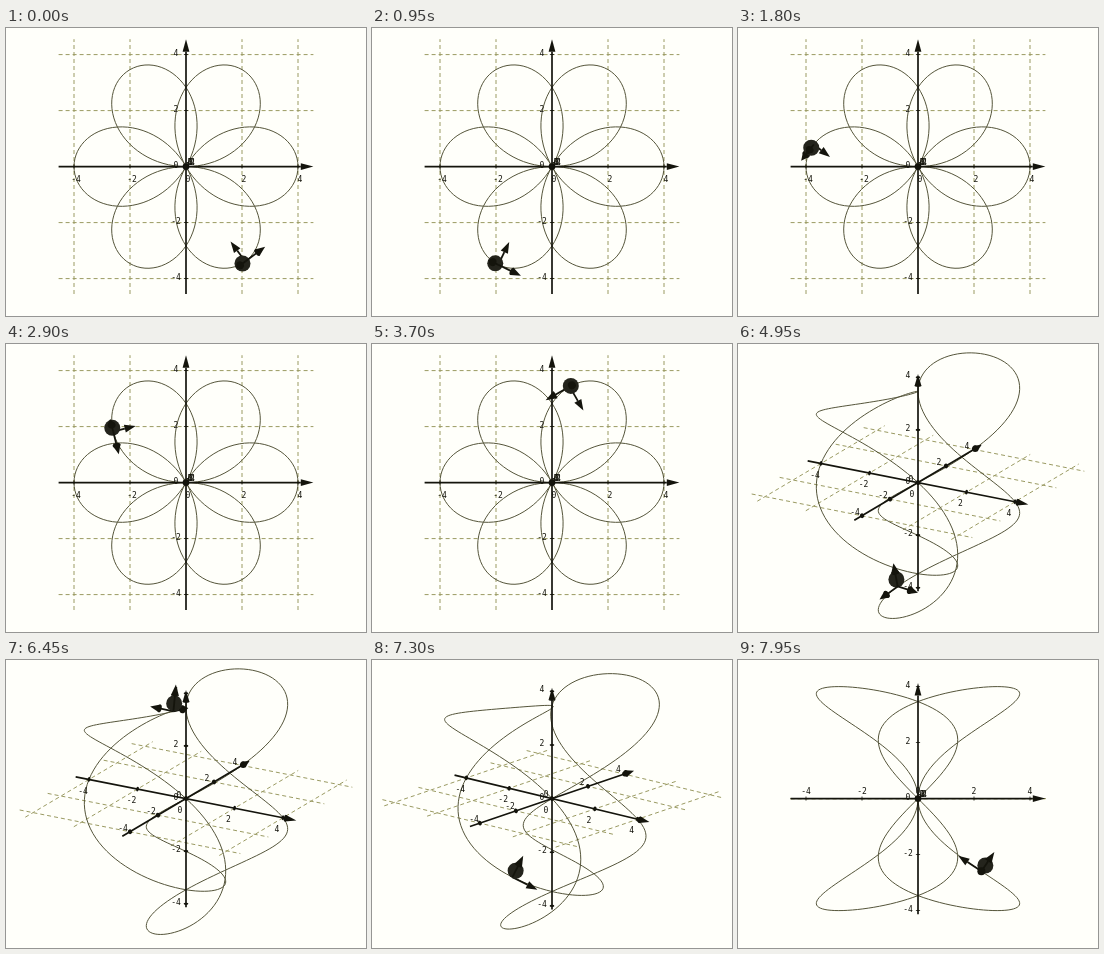
An HTML page with a canvas that plays this animation: 360x288 px, repeating every 8 s.

```html
<!DOCTYPE html>
<html lang="en">
<head>
<meta charset="utf-8">
<title>Moving frame on a space curve</title>
<style>
  html, body { margin: 0; width: 100%; height: 100%; overflow: hidden; background: #fffffa; }
  canvas { display: block; width: 360px; height: 288px; }
</style>
</head>
<body>
<canvas id="stage" width="360" height="288"></canvas>
<script>
const ctx = document.getElementById('stage').getContext('2d');
const LOOP = 8000, STEP = 50, UNIT = 28, CX = 180, CY = 138.6, RAD = Math.PI / 180;
const INK = '#14140c', CURVE = '#55553a', GRID = '#9a9a62', PAPER = '#fffffa';

// time (ms) -> curve parameter (degrees)
const TRAVEL = [[0, 122], [1800, 348], [2900, 505], [4300, 705.5], [4950, 789], [6450, 1004], [7950, 1219.5], [8000, 1226.7]];

// camera poses: turn, elevation and label offsets of the x and y axes
const VIEWS = [
  { turn: 0, lift: 90, xLabel: [2, 13], yLabel: [-10, -1] },
  { turn: 30, lift: 20, xLabel: [-6, 12], yLabel: [-7, -3] },
  { turn: 90, lift: 0, xLabel: [-6, 12], yLabel: [0, -7] }
];
const TURNS = [3905, 6890];
const TURN_TIME = 1000;

const mix = (a, b, s) => a + (b - a) * s;
const mixPair = (a, b, s) => [mix(a[0], b[0], s), mix(a[1], b[1], s)];
const add = (p, v, k = 1) => p.map((c, i) => c + v[i] * k);
const unit = v => { const n = Math.hypot(...v); return v.map(c => c / n); };
const cross = (a, b) => [a[1] * b[2] - a[2] * b[1], a[2] * b[0] - a[0] * b[2], a[0] * b[1] - a[1] * b[0]];

let cam;

function setCamera(t) {
  const leg = t < TURNS[1] ? 0 : 1;
  const s = Math.min(1, Math.max(0, (t - TURNS[leg]) / TURN_TIME)) ** 2;
  const from = VIEWS[leg], to = VIEWS[leg + 1];
  const turn = mix(from.turn, to.turn, s) * RAD, lift = mix(from.lift, to.lift, s) * RAD;
  cam = {
    ca: Math.cos(turn), sa: Math.sin(turn), ce: Math.cos(lift), se: Math.sin(lift),
    xLabel: mixPair(from.xLabel, to.xLabel, s),
    yLabel: mixPair(from.yLabel, to.yLabel, s)
  };
}

function project([x, y, z]) {
  return [
    CX + UNIT * (x * cam.ca + y * cam.sa),
    CY + UNIT * ((x * cam.sa - y * cam.ca) * cam.se - z * cam.ce)
  ];
}

// distance towards the viewer
const depth = ([x, y, z]) => (x * cam.sa - y * cam.ca) * cam.ce + z * cam.se;

function travel(t) {
  const i = Math.max(1, TRAVEL.findIndex(k => k[0] > t));
  const [t0, a] = TRAVEL[i - 1], [t1, b] = TRAVEL[i];
  return mix(a, b, (t - t0) / (t1 - t0)) * RAD;
}

function curvePoint(q) {
  const r = 4 * Math.cos(1.5 * q);
  return [r * Math.cos(q), r * Math.sin(q), -4 * Math.sin(q)];
}

function tangent(q) {
  const r = 4 * Math.cos(1.5 * q), dr = -6 * Math.sin(1.5 * q);
  const c = Math.cos(q), s = Math.sin(q);
  return unit([dr * c - r * s, dr * s + r * c, -4 * c]);
}

function line(a, b, width, color) {
  ctx.strokeStyle = color;
  ctx.lineWidth = width;
  ctx.beginPath();
  ctx.moveTo(...project(a));
  ctx.lineTo(...project(b));
  ctx.stroke();
}

function ellipse([x, y], rx, ry, angle = 0) {
  ctx.beginPath();
  ctx.ellipse(x, y, rx, ry, angle, 0, 2 * Math.PI);
  ctx.fill();
}

// shaft with a cone head; seen end-on the cone becomes a disc
function arrow(from, to, head, half, width) {
  const dir = unit(add(to, from, -1));
  const base = add(to, dir, -head);
  line(from, base, width, INK);
  const tip = project(to), foot = project(base);
  const angle = Math.atan2(tip[1] - foot[1], tip[0] - foot[0]);
  const nx = -Math.sin(angle) * half, ny = Math.cos(angle) * half;
  ctx.fillStyle = INK;
  ctx.beginPath();
  ctx.moveTo(...tip);
  ctx.lineTo(foot[0] + nx, foot[1] + ny);
  ctx.lineTo(foot[0] - nx, foot[1] - ny);
  ctx.fill();
  ellipse(foot, half * Math.abs(depth(dir)), half, angle);
}

function drawGrid() {
  ctx.setLineDash([4, 3]);
  for (const k of [-4, -2, 2, 4]) {
    line([k, -4.55, 0], [k, 4.55, 0], 1, GRID);
    line([-4.55, k, 0], [4.55, k, 0], 1, GRID);
  }
  ctx.setLineDash([]);
}

function drawAxis(dir, reach, offset) {
  const at = k => dir.map(c => c * k);
  arrow(at(-reach), at(reach), 0.45, 3.4, 1.7);
  const d = Math.abs(depth(dir)), flat = Math.sqrt(Math.max(0, 1 - d * d));
  const [ex, ey] = project(dir), angle = Math.atan2(ey - CY, ex - CX);
  const [ox, oy] = flat < 0.12 ? [4, -4] : offset;
  ctx.fillStyle = INK;
  for (const k of [-4, -2, 0, 2, 4]) {
    const p = project(at(k));
    ellipse(p, 0.5 + 1.9 * d, 2.4, angle);
    ctx.fillText(k, p[0] + ox, p[1] + oy);
  }
}

function drawCurve() {
  ctx.strokeStyle = CURVE;
  ctx.lineWidth = 1;
  ctx.beginPath();
  for (let d = 0; d <= 720; d += 2) ctx.lineTo(...project(curvePoint(d * RAD)));
  ctx.stroke();
}

// the side and up arrows shorten as the tangent gets steeper
function drawTraveller(q) {
  const p = curvePoint(q), t = tangent(q);
  const side = cross([0, 0, 1], t), up = cross(t, side);
  const parts = [t, side, up].map(v => ({
    z: depth(v) * 0.6,
    draw: () => arrow(p, add(p, v), 0.4, 4, 1.8)
  }));
  parts.push({
    z: depth(up) * 0.3,
    draw: () => { ctx.fillStyle = '#24241c'; ellipse(project(add(p, up, 0.3)), 8, 8); }
  });
  parts.sort((a, b) => a.z - b.z).forEach(part => part.draw());
}

function render(now) {
  const t = Math.floor((now % LOOP) / STEP) * STEP;
  setCamera(t);
  ctx.fillStyle = PAPER;
  ctx.fillRect(0, 0, 360, 288);
  ctx.font = '8px "DejaVu Sans Mono", monospace';
  ctx.textAlign = 'center';
  ctx.textBaseline = 'middle';
  drawGrid();
  drawCurve();
  drawAxis([1, 0, 0], 4.55, cam.xLabel);
  drawAxis([0, 1, 0], 4.55, cam.yLabel);
  drawAxis([0, 0, 1], 4.13, [-10, -1]);
  drawTraveller(travel(t));
}

const start = performance.now();
function tick() {
  render(performance.now() - start);
  requestAnimationFrame(tick);
}
tick();
</script>
</body>
</html>
```
